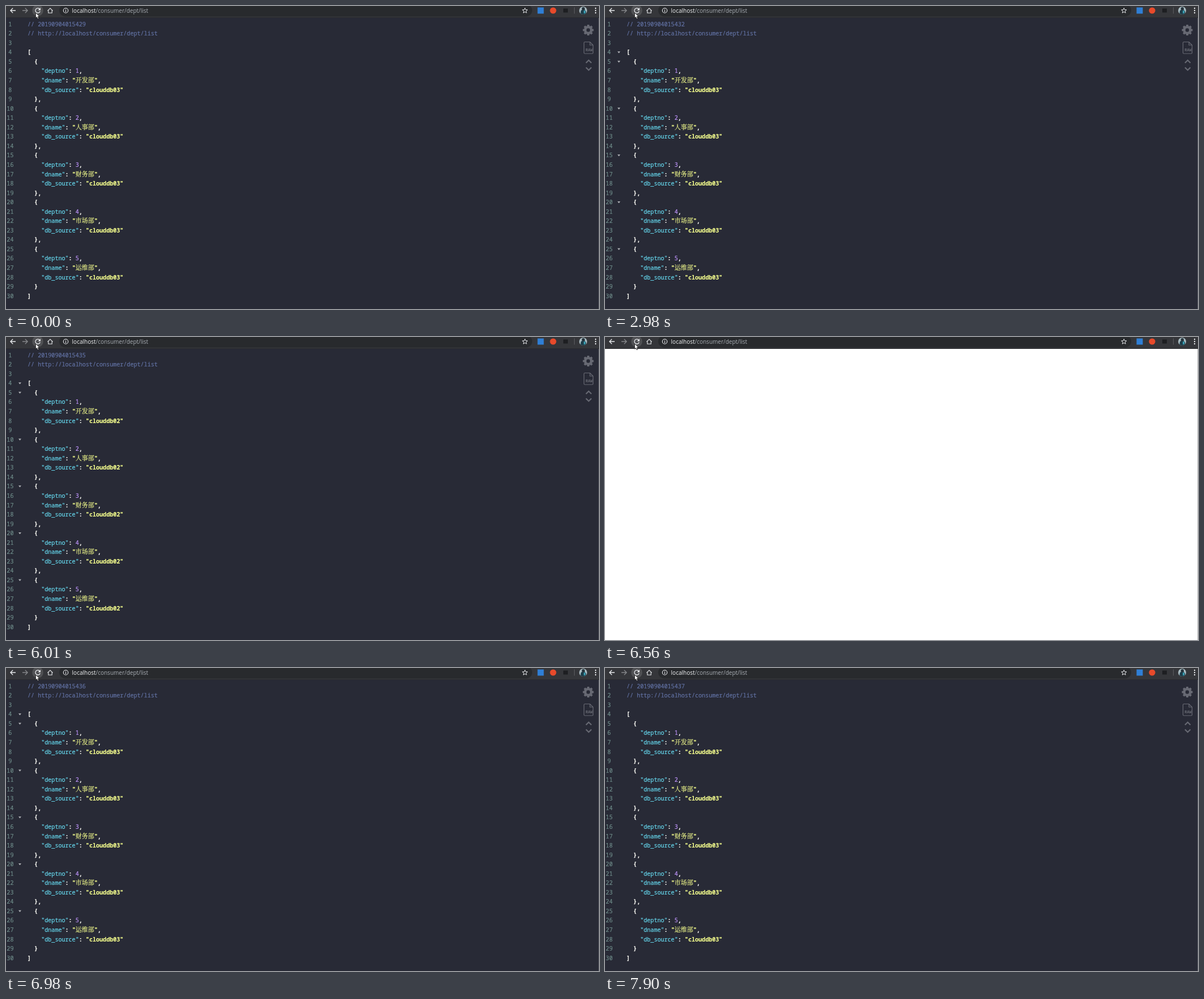
Animation, 1047 px wide and 535 px high, one loop 8 s. Source, as an HTML page:

```html
<!DOCTYPE html>
<html lang="zh-CN">
<head>
<meta charset="utf-8">
<title>JSON list</title>
<style>
html, body { margin: 0; width: 100%; height: 100%; overflow: hidden; background: #282a36; }
svg { display: block; width: 1047px; height: 535px; }
text { white-space: pre; }
#page text { font: 10.08px "Noto Sans Mono", "DejaVu Sans Mono", monospace; }
#page .cjk { font: 11px "Noto Serif CJK SC", "Noto Sans CJK SC", sans-serif; }
#page .raw { font: bold 7px "Liberation Mono", monospace; fill: #676973; }
#code text { fill: var(--ink); stroke: var(--ink); stroke-width: .2; }
.num { --ink: #6d8a88; text-anchor: middle; }
.note { --ink: #6272a4; }
.key { --ink: #66d9ef; }
.str, .cjk { --ink: #f1fa8c; }
.val { --ink: #bd93f9; }
.pun { --ink: #f8f8f2; }
#page .str, #page .pun { font-weight: 600; }
.url { font: 10px "Open Sans", "Noto Sans", sans-serif; }
.line { fill: none; stroke: #e8eaed; stroke-width: 1.3; }
.tool { fill: none; stroke: #676973; }
</style>
</head>
<body>
<svg viewBox="0 0 1047 535">
  <rect width="1047" height="535" fill="#282a36"/>
  <g id="page">
    <g id="code"></g>
    <g id="folds" fill="#b4b6ba"></g>
    <g id="gear" fill="#676973">
      <path fill-rule="evenodd" d="M1020.6 42.5a7.4 7.4 0 1 0 14.8 0a7.4 7.4 0 1 0-14.8 0M1024.8 42.5a3.2 3.2 0 1 0 6.4 0a3.2 3.2 0 1 0-6.4 0"/>
    </g>
    <path class="tool" stroke-width="1.2" d="M1022 63.5H1031L1036.5 69V82.5Q1036.5 84 1035 84H1022Q1020.5 84 1020.5 82.5V65Q1020.5 63.5 1022 63.5M1031 63.5V69H1036.5"/>
    <text class="raw" x="1023.2" y="80">RAW</text>
    <path class="tool" stroke-width="2.2" d="M1024 100.5L1028.8 95.8L1033.6 100.5M1024 108.5L1028.8 113.2L1033.6 108.5"/>
  </g>
  <rect id="blank" y="21" width="1047" height="514" fill="#fff"/>
  <rect id="edge" x="1046" y="21" width="1" height="514"/>

  <rect width="1047" height="21" fill="#35363a"/>
  <rect x="94" y="-3" width="835" height="21.5" rx="10.7" fill="#282a2d"/>
  <rect y="20" width="1047" height="1" fill="#2a2b2e"/>
  <circle cx="56" cy="8" r="9.8" fill="#505154"/>
  <path class="line" d="M17 8H8M12.2 3.7L7.9 8L12.2 12.3"/>
  <path class="line" style="stroke:#85878a" d="M29 8H38M33.8 3.7L38.1 8L33.8 12.3"/>
  <path class="line" d="M59.6 5.6A4.2 4.2 0 1 0 60.2 9.2"/>
  <path fill="#e8eaed" d="M61 3V7.4H56.6Z"/>
  <path class="line" style="stroke-width:1.1" d="M73.4 8.4L78 4L82.6 8.4M74.8 7.4V12.3H81.2V7.4"/>
  <circle class="line" cx="105.5" cy="8" r="4.2" style="stroke-width:1.1"/>
  <path class="line" d="M105.5 7.4V10.4M105.5 5.4V6.6"/>
  <text class="url" x="116.6" y="11.5" fill="#f1f3f4">localhost<tspan fill="#a9aeb4">/consumer/dept/list</tspan></text>
  <path id="star" class="line" style="stroke-width:1"/>
  <rect x="938.5" y="2.5" width="11" height="11" fill="#2f7fd6"/>
  <circle cx="966" cy="8" r="5.6" fill="#e84a2b"/>
  <rect x="984" y="4.5" width="8" height="7" fill="#1d1e21"/>
  <path d="M1003.5 2.5V13.5" stroke="#5b5d61"/>
  <clipPath id="round"><circle cx="1019" cy="8" r="7"/></clipPath>
  <g clip-path="url(#round)">
    <rect x="1012" y="1" width="14" height="14" fill="#a9bcc2"/>
    <path fill="#1d3d49" d="M1014 16L1015 8.5L1017.5 6H1021.5L1024 9.5L1024.5 16Z"/>
    <circle cx="1019.3" cy="4.8" r="2.7" fill="#26343c"/>
    <rect x="1020" y="8" width="3" height="5" fill="#3a9aae"/>
  </g>
  <g fill="#e8eaed"><circle cx="1041" cy="4" r="1.2"/><circle cx="1041" cy="8" r="1.2"/><circle cx="1041" cy="12" r="1.2"/></g>
  <path fill="#fff" stroke="#111" stroke-width=".8" d="M52.4 11.8V21.2L54.5 19.3L56 22.7L57.7 22L56.3 18.7H59.2Z"/>
</svg>
<script>
const $ = id => document.getElementById(id);
const PERIOD = 8000, LEFT = 38, CHAR = 6.05;
const rowY = n => 32 + (n - 1) * 16.55;

// start, timestamp second, database number, when fold arrows appear
const loads = [
  [0, 29, 3, 560],
  [1610, 31, 2, 2040],
  [2710, 32, 3, 2980],
  [4210, 33, 3, 4630],
  [5590, 35, 2, 6010],
  [6710, 36, 3, 6980],
  [7900, 37, 3, PERIOD]
];
const blanks = [[6560, 6710], [7750, 7900]];

function add(parent, tag, attrs, content = "") {
  const el = document.createElementNS("http://www.w3.org/2000/svg", tag);
  for (const k in attrs) el.setAttribute(k, attrs[k]);
  el.textContent = content;
  return parent.appendChild(el);
}

let row = 0;
const newRow = () => add($("code"), "text", { class: "num", x: 7.4, y: rowY(++row) + 3.7 }, row);
const put = (col, cls, s) =>
  add($("code"), "text", { class: cls, x: LEFT + col * CHAR, y: rowY(row) + 3.7 }, s);

function line(col, cls, s) {
  newRow();
  return put(col, cls, s);
}

function openLine(col, s) {
  line(col, "pun", s);
  const y = rowY(row);
  add($("folds"), "path", { d: `M22 ${y - 1.5}H27L24.5 ${y + 1.9}Z` });
}

function keyLine(name) {
  line(4, "key", `"${name}"`);
  const end = 6 + name.length;
  put(end, "pun", ":");
  return end + 2;
}

const stamp = line(0, "note", "");
line(0, "note", "// http://localhost/consumer/dept/list");
newRow();
openLine(0, "[");
const sources = ["开发部", "人事部", "财务部", "市场部", "运维部"].map((dept, i, all) => {
  openLine(2, "{");
  let col = keyLine("deptno");
  put(col, "val", i + 1);
  put(col + 1, "pun", ",");
  col = keyLine("dname");
  put(col, "str", '"');
  put(col + 1, "cjk", dept);
  const after = col + 1 + 33 / CHAR;
  put(after, "str", '"');
  put(after + 1, "pun", ",");
  const source = put(keyLine("db_source"), "str", "");
  line(2, "pun", i < all.length - 1 ? "}," : "}");
  return source;
});
line(0, "pun", "]");

for (let a = 0; a < 360; a += 45)
  add($("gear"), "path", { d: "M1025.6 36.5L1026.3 33H1029.7L1030.4 36.5Z", transform: `rotate(${a} 1028 42.5)` });

const starPoint = (_, i) => {
  const r = i % 2 ? 2.1 : 4.8, a = i * Math.PI / 5;
  return `${916.3 + r * Math.sin(a)} ${8.3 - r * Math.cos(a)}`;
};
$("star").setAttribute("d", "M" + Array.from({ length: 10 }, starPoint).join("L") + "Z");

const show = (id, on) => $(id).setAttribute("visibility", on ? "visible" : "hidden");

function draw(t) {
  const [, second, db, foldsAt] = loads.filter(l => l[0] <= t).pop();
  const blank = blanks.some(([from, to]) => t >= from && t < to);
  stamp.textContent = "// 201909040154" + second;
  for (const s of sources) s.textContent = `"clouddb0${db}"`;
  show("page", !blank);
  show("folds", !blank && t >= foldsAt);
  show("blank", blank);
  $("edge").setAttribute("fill", blank ? "#b8b8b8" : "#565861");
}

const start = performance.now();
function tick() {
  draw((performance.now() - start) % PERIOD);
  requestAnimationFrame(tick);
}
draw(0);
requestAnimationFrame(tick);
</script>
</body>
</html>
```
